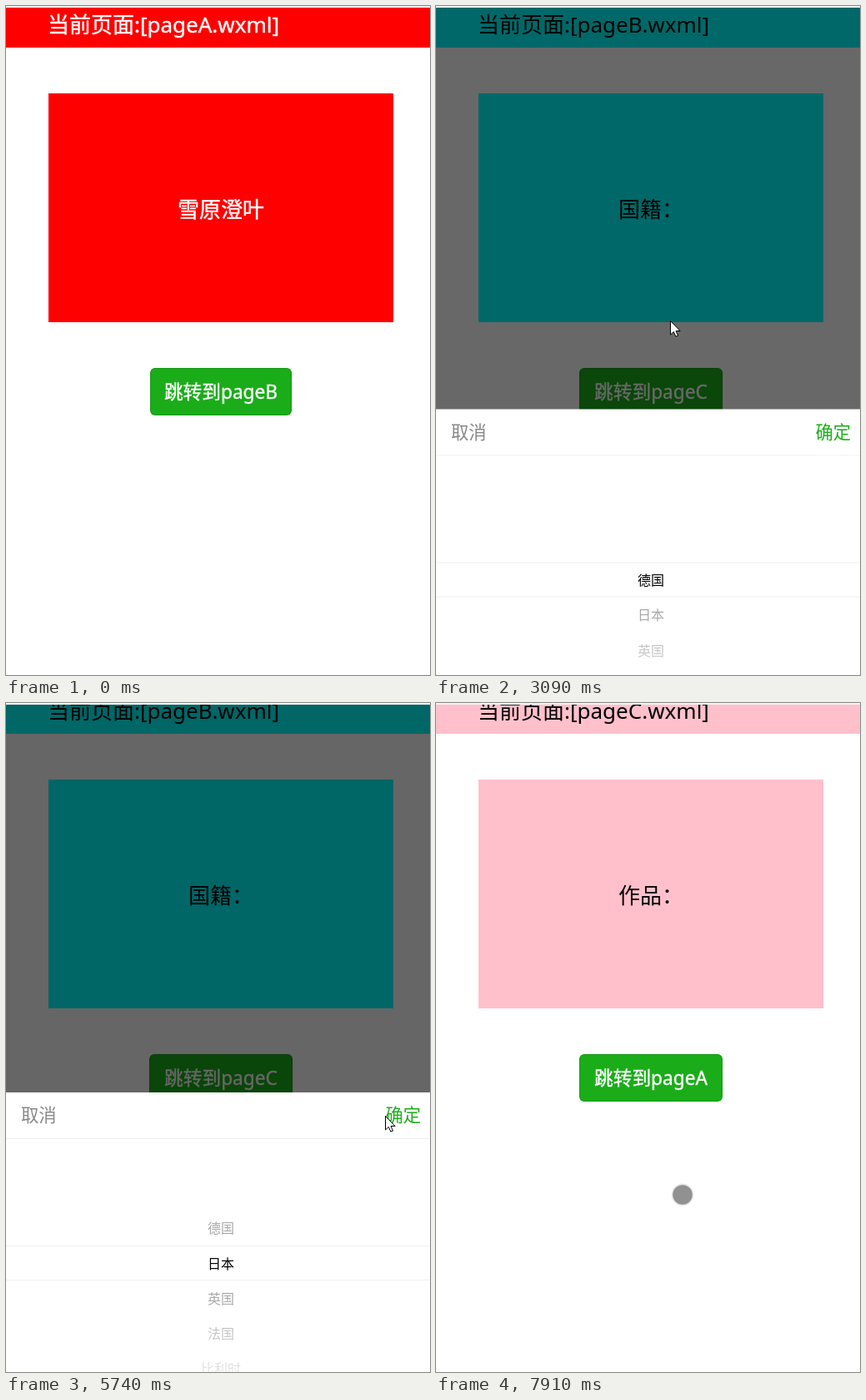
These frames come from a looping animation (509 px wide and 804 px high, 7.99 s). An HTML page with a canvas:

```html
<!DOCTYPE html>
<html lang="zh-CN">
<head>
<meta charset="utf-8">
<title>Page navigation demo</title>
<style>
html, body { margin: 0; width: 100%; height: 100%; overflow: hidden; background: #fff; }
canvas { display: block; width: 509px; height: 804px; }
</style>
</head>
<body>
<canvas id="stage"></canvas>
<script>
const W = 509, H = 804, LOOP = 7990;
const PAGE_W = 516, MID = 258, SLIDE = 320;
const FONT = '"Noto Sans", "Noto Sans CJK SC", "Noto Sans CJK", sans-serif';
const GREEN = '#1aad19', LIGHT = '#fff';

const canvas = document.getElementById('stage');
const ctx = canvas.getContext('2d');
const dpr = window.devicePixelRatio || 1;
canvas.width = W * dpr;
canvas.height = H * dpr;

const pages = {
  A: { color: '#f00', ink: LIGHT, label: '雪原澄叶', next: 'B', half: 85 },
  B: { color: '#0ff', ink: '#000', label: '国籍：', next: 'C', half: 86 },
  C: { color: '#ffc0cb', ink: '#000', label: '作品：', next: 'A', half: 86 }
};
const countries = ['德国', '日本', '英国', '法国', '比利时'];

// Pointer moves: begin, end, and where it comes to rest
const entry = { x: 404, y: 778 };
const moves = [
  [460, 920, 245, 462],
  [1150, 1470, 416, 417],
  [2080, 2480, 262, 310],
  [2900, 3550, 355, 635],
  [3640, 4100, 265, 738],
  [4400, 4790, 382, 587],
  [4790, 5190, 515, 512],
  [5340, 5740, 455, 496],
  [5890, 6350, 258, 428],
  [6350, 6750, 258, 447],
  [7210, 7850, 296, 591]
];

const clamp = v => Math.max(0, Math.min(1, v));
const ramp = (t, from, span) => clamp((t - from) / span);
const easeOut = p => 1 - (1 - p) ** 3;
const smooth = p => p * p * (3 - 2 * p);
const within = (t, from, to) => t >= from && t < to;
const glide = (t, from) => easeOut(ramp(t, from, SLIDE));

function rect(x, y, w, h, color) {
  ctx.fillStyle = color;
  ctx.fillRect(x, y, w, h);
}

function text(str, x, y, size, color, align = 'center') {
  ctx.font = `${size}px ${FONT}`;
  ctx.textAlign = align;
  ctx.fillStyle = ctx.strokeStyle = color;
  ctx.fillText(str, x, y);
  if (color === LIGHT) {
    // White lettering is a touch heavier
    ctx.lineWidth = 0.4;
    ctx.strokeText(str, x, y);
  }
}

function drawButton(label, half, pressed) {
  ctx.beginPath();
  ctx.roundRect(MID - half, 435, half * 2, 57, 6);
  ctx.fillStyle = pressed ? '#179b16' : GREEN;
  ctx.fill();
  ctx.beginPath();
  ctx.roundRect(MID - half + 0.35, 435.35, half * 2 - 0.7, 56.3, 6);
  ctx.strokeStyle = 'rgba(0,0,0,.2)';
  ctx.lineWidth = 0.7;
  ctx.stroke();
  text(label, MID, 472, 22.7, pressed ? 'rgba(255,255,255,.6)' : LIGHT);
}

function drawPage(name, shown, label, pressed) {
  const page = pages[name];
  ctx.save();
  ctx.translate(PAGE_W * (1 - shown), 0);
  rect(0, 0, PAGE_W, H + 20, '#fff');
  rect(0, 0, PAGE_W, 50, page.color);
  text(`当前页面:[page${name}.wxml]`, 50, 32, 26, page.ink, 'left');
  rect(51, 105, 414, 275, page.color);
  text(label || page.label, MID, 254, 26, page.ink);
  drawButton('跳转到page' + page.next, page.half, pressed);
  ctx.restore();
}

function fade(y, h, from, to) {
  const g = ctx.createLinearGradient(0, y, 0, y + h);
  g.addColorStop(0, `rgba(255,255,255,${from})`);
  g.addColorStop(1, `rgba(255,255,255,${to})`);
  rect(0, y, PAGE_W, h, g);
}

function drawPicker(open, scroll) {
  rect(0, 0, PAGE_W, H + 20, `rgba(0,0,0,${0.6 * open})`);
  ctx.save();
  ctx.translate(0, 354 * (1 - open));
  rect(0, 481, PAGE_W, 354, '#fff');
  countries.forEach((c, i) => text(c, MID, 692.5 + 42.3 * (i - scroll), 16, '#000'));
  fade(537, 128, 0.95, 0.6);
  fade(707, 128, 0.6, 0.95);
  for (const y of [536, 665, 706]) rect(0, y, PAGE_W, 1, '#f0f0f0');
  text('取消', 18, 516, 21.3, '#888', 'left');
  text('确定', 498, 516, 21.3, GREEN, 'right');
  ctx.restore();
}

function pointerAt(t) {
  let { x, y } = entry;
  for (const [begin, end, toX, toY] of moves) {
    const p = smooth(ramp(t, begin, end - begin));
    x += (toX - x) * p;
    y += (toY - y) * p;
  }
  return [x, y];
}

function drawDot(x, y) {
  ctx.beginPath();
  ctx.arc(x, y, 12, 0, Math.PI * 2);
  ctx.fillStyle = 'rgba(0,0,0,.43)';
  ctx.fill();
  ctx.beginPath();
  ctx.arc(x, y, 12.5, 0, Math.PI * 2);
  ctx.strokeStyle = 'rgba(215,215,215,.55)';
  ctx.lineWidth = 1.8;
  ctx.stroke();
}

function drawArrow(x, y) {
  ctx.save();
  ctx.translate(Math.round(x) + 0.5, Math.round(y) + 0.5);
  ctx.fillStyle = '#fff';
  ctx.strokeStyle = '#000';
  ctx.lineWidth = 1;
  const shape = new Path2D('M0 0V16.5L3.8 13L6.4 18.7L9 17.6L6.5 12H11.6Z');
  ctx.fill(shape);
  ctx.stroke(shape);
  ctx.restore();
}

function draw(t) {
  ctx.setTransform(dpr, 0, 0, dpr, 0, 0);
  rect(0, 0, W, H, '#fff');

  ctx.save();
  ctx.translate(0, t >= 4260 ? -13 : 0);
  const toB = glide(t, 1790), toC = glide(t, 7480);
  const chosen = t >= 5890 ? '国籍：日本' : '';
  if (toB < 1) drawPage('A', 1, '', within(t, 1150, 1300));
  if (toB > 0 && toC < 1) drawPage('B', toB, chosen, within(t, 7210, 7350));
  if (toC > 0) drawPage('C', toC);

  const open = glide(t, 2840) - glide(t, 5870);
  if (open > 0) drawPicker(open, glide(t, 4260));
  ctx.restore();

  rect(0, 0, W, 2, '#f3f3f3');

  if (t >= 460 && !within(t, 5190, 5340)) {
    const [x, y] = pointerAt(t);
    (within(t, 2850, 5890) ? drawArrow : drawDot)(x, y);
  }
}

const start = performance.now();
function tick() {
  draw((performance.now() - start) % LOOP);
  requestAnimationFrame(tick);
}
tick();
</script>
</body>
</html>
```
